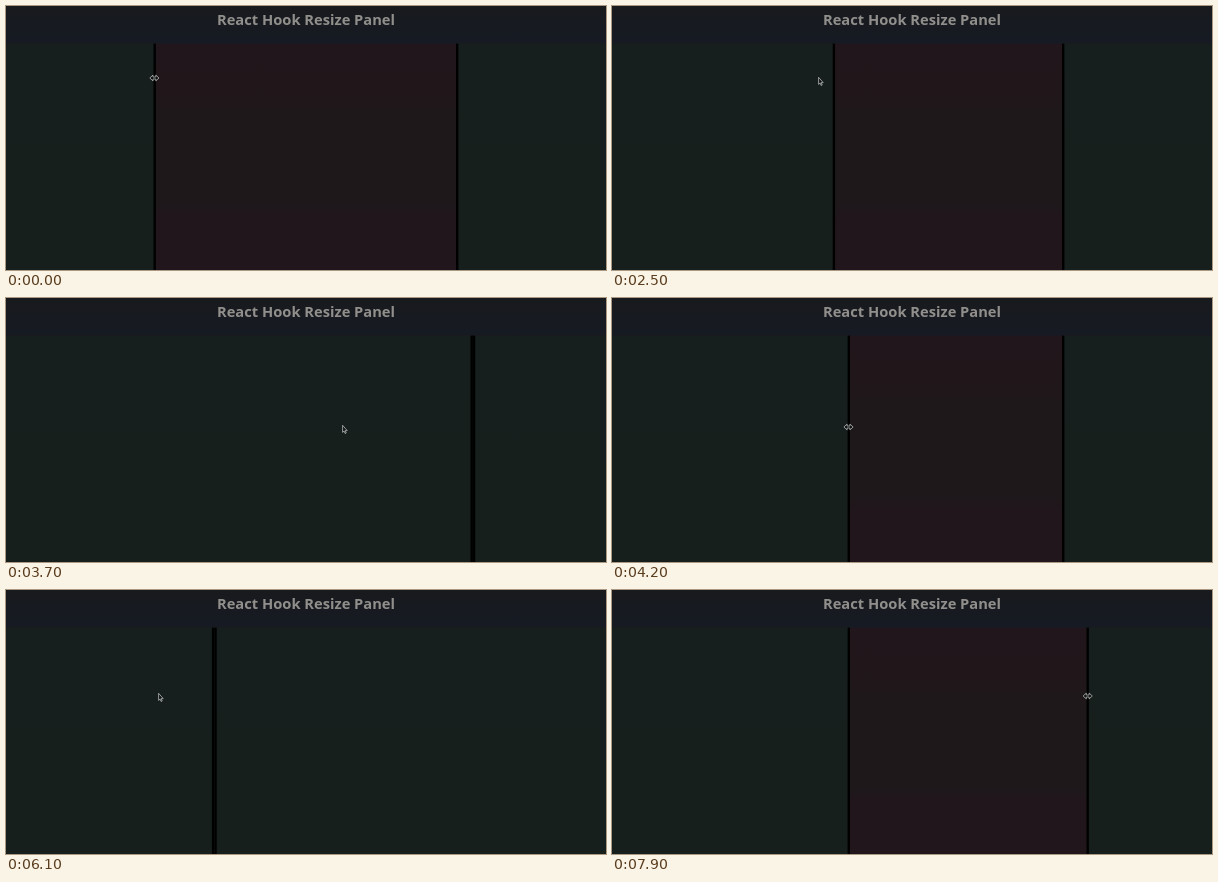
Animation of 600x264 px, one loop 8 s. Source, as an HTML page:

```html
<!DOCTYPE html>
<html lang="en">
<head>
<meta charset="utf-8">
<title>React Hook Resize Panel</title>
<style>
  html, body { margin: 0; width: 100%; height: 100%; overflow: hidden; background: #171a20; }
  svg { display: block; width: 600px; height: 264px; }
  text { font: 700 14.7px "Open Sans", "Noto Sans", sans-serif; fill: #918f8c; text-anchor: middle; }
  .icon { fill: #121516; stroke: #c0c2c2; stroke-width: .75; }
</style>
</head>
<body>
<svg viewBox="0 0 600 264">
  <defs>
    <linearGradient id="head" x2="0" y2="1">
      <stop offset="0" stop-color="#181a1d"/>
      <stop offset="1" stop-color="#161a23"/>
    </linearGradient>
    <linearGradient id="mid" x2="0" y2="1">
      <stop offset="0" stop-color="#21161b"/>
      <stop offset=".25" stop-color="#20171b"/>
      <stop offset=".3" stop-color="#1e181b"/>
      <stop offset=".7" stop-color="#1e181b"/>
      <stop offset=".76" stop-color="#20161b"/>
      <stop offset="1" stop-color="#21161b"/>
    </linearGradient>
    <linearGradient id="side" x2="0" y2="1">
      <stop offset="0" stop-color="#171f1e"/>
      <stop offset="1" stop-color="#161f1c"/>
    </linearGradient>
  </defs>
  <rect width="600" height="38" fill="url(#head)"/>
  <text x="300" y="19">React Hook Resize Panel</text>
  <rect y="37.6" width="600" height="227" fill="url(#mid)"/>
  <g id="left">
    <rect x="-600" y="37.6" width="600" height="227" fill="url(#side)"/>
    <rect x="-2.4" y="37.6" width="2.4" height="227"/>
  </g>
  <g id="right">
    <rect y="37.6" width="600" height="227" fill="url(#side)"/>
    <rect y="37.6" width="2.4" height="227"/>
  </g>
  <path id="arrow" class="icon" d="M-.4 .3V7.4L1.1 6L2.1 8.5L3.2 8L2.2 5.6H4.2Z"/>
  <path id="resize" class="icon" d="M-4.6 0L-1.4 -2.9V-1H1.4V-2.9L4.6 0L1.4 2.9V1H-1.4V2.9Z"/>
</svg>
<script>
  const LOOP = 8000, STEP = 100, LAG = .81;

  // Pointer stops and turns: time, x, y, rest
  const keys = [
    [0, 148.4, 72, 900], [1500, 275, 58], [1900, 343, 62], [2400, 225, 70], [2500, 207, 71],
    [2800, 103, 34], [3200, 495.5, 98, 400], [3700, 337, 127], [3900, 222.5, 130],
    [4100, 236.5, 129, 200], [5200, 451.3, 104, 520], [6100, 153, 103], [6200, 131, 103],
    [6930, 320, 105, 170], [7200, 461, 106, 300], [7800, 475.7, 106, 200]
  ];
  const path = keys.flatMap(([t, x, y, rest]) => rest ? [[t, x, y], [t + rest, x, y]] : [[t, x, y]]);

  const [left, right, arrow, resize] =
    ["left", "right", "arrow", "resize"].map(id => document.getElementById(id));

  // Slope at a key: flat at turns and rests, else the harmonic mean of both sides
  function slope(i, axis) {
    if (i < 1 || i > path.length - 2) return 0;
    const rate = j => (path[j + 1][axis] - path[j][axis]) / (path[j + 1][0] - path[j][0]);
    const a = rate(i - 1), b = rate(i);
    return a * b > 0 ? 2 * a * b / (a + b) : 0;
  }

  function pointer(t, axis) {
    t = Math.max(0, t);
    const i = path.findIndex(p => p[0] > t), a = path[i - 1], b = path[i];
    const span = b[0] - a[0], k = (t - a[0]) / span, r = 1 - k;
    return a[axis] + (b[axis] - a[axis]) * k * k * (3 - 2 * k)
      + span * k * r * (r * slope(i - 1, axis) - k * slope(i, axis));
  }

  // Edges trail the pointer; one panel pushes the other when they meet
  function edges(t) {
    const x = pointer(t - STEP, 1) * LAG + pointer(t, 1) * (1 - LAG);
    if (t < 4300) {
      const l = x + 1.5;
      return [l, Math.max(450, l)];
    }
    const r = t < 5800 ? 450 : x - 1.2;
    return [Math.min(238, r), r];
  }

  const move = (el, x, y) => el.setAttribute("transform", `translate(${x} ${y})`);
  const show = (el, on) => el.setAttribute("visibility", on ? "visible" : "hidden");

  function draw() {
    const t = Math.floor(performance.now() % LOOP / STEP) * STEP;
    const x = pointer(t, 1), y = pointer(t, 2), [l, r] = edges(t);
    const over = Math.abs(x - l + 1.2) < 3 || Math.abs(x - r - 1.2) < 3;
    move(left, l, 0);
    move(right, r, 0);
    move(arrow, x, y);
    move(resize, x, y);
    show(arrow, !over);
    show(resize, over);
    requestAnimationFrame(draw);
  }
  draw();
</script>
</body>
</html>
```
